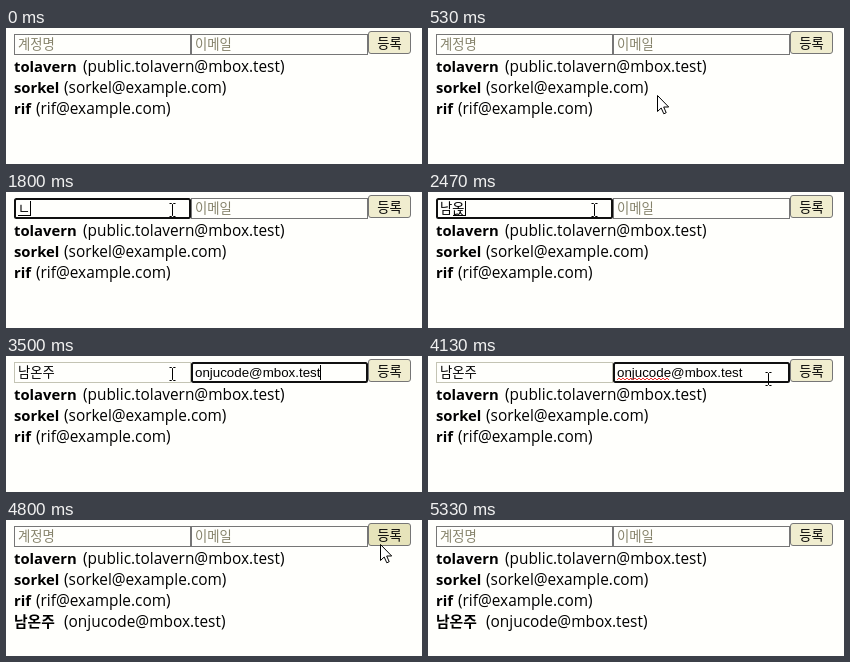
An HTML page that plays this animation: 416 px wide and 136 px high, repeating every 6110 ms.

```html
<!DOCTYPE html>
<html lang="ko">
<head>
<meta charset="utf-8">
<style>
  html, body { margin: 0; width: 100%; height: 100%; overflow: hidden; background: #fffffc; }
  svg { display: block; }
  text { white-space: pre; }
  .list { font: 15.4px "Open Sans", "Noto Sans CJK KR", sans-serif; }
  .list .name { font-weight: 700; font-size: 14.8px; }
  .form { font: 13.333px "Liberation Sans", "Noto Sans CJK KR", sans-serif; }
</style>
</head>
<body>
<svg id="stage" width="416" height="136" viewBox="0 0 416 136"></svg>
<script>
const LOOP = 6110;
const stage = document.getElementById('stage');

function add(tag, attrs, parent = stage, text = '') {
  const el = document.createElementNS('http://www.w3.org/2000/svg', tag);
  set(el, attrs);
  el.textContent = text;
  return parent.appendChild(el);
}
function set(el, attrs) {
  for (const key in attrs) el.setAttribute(key, attrs[key]);
}
function show(el, on) {
  el.style.display = on ? '' : 'none';
}

// User list
const users = [
  ['tolavern', 'public.tolavern@mbox.test', 77],
  ['sorkel', 'sorkel@example.com', 58],
  ['rif', 'rif@example.com', 30],
  ['남온주', 'onjucode@mbox.test', 58]
];
const list = add('g', { class: 'list' });
const rows = users.map(([name, mail, x], i) => {
  const row = add('g', { transform: `translate(0 ${44 + i * 21})` }, list);
  add('text', { x: 8, class: 'name' }, row, name);
  add('text', { x }, row, `(${mail})`);
  return row;
});

// Form
const form = add('g', { class: 'form' });
function makeField(x, hint) {
  return {
    x, hint,
    box: add('rect', { fill: '#fffffc' }, form),
    label: add('text', { x: x + 4, y: 21 }, form),
    line: add('rect', { y: 23, height: 1 }, form),
    caret: add('rect', { y: 9, width: 1, height: 15 }, form)
  };
}
const nameField = makeField(8, '계정명');
const mailField = makeField(185, '이메일');
const squiggle = add('path', {
  d: 'M189 24' + 'l2 -2l2 2'.repeat(13), fill: 'none', stroke: '#f03030'
}, form);
const button = add('rect', {
  x: 362.5, y: 3.5, width: 42, height: 22, rx: 2.5, stroke: '#767676'
}, form);
add('text', { x: 383.5, y: 20, 'text-anchor': 'middle' }, form, '등록');

// Pointer shapes, hot spot at the origin
const arrow = add('path', {
  d: 'M0.5 0.5V16.5L4.2 13L6.8 18.8L9.2 17.7L6.7 12H11.7Z',
  fill: '#fff', stroke: '#000'
});
const beam = add('path', {
  d: 'M-3 -6.5H-1L0 -5.5L1 -6.5H3M0 -5.5V5.5M-3 6.5H-1L0 5.5L1 6.5H3',
  fill: 'none', stroke: '#000'
});

const keys = [
  [1800, 'ㄴ'], [1900, '나'], [2000, '남'], [2100, '남ㅇ'],
  [2200, '남오'], [2300, '남온'], [2470, '남옩'], [2500, '남온주']
];
const path = [
  [330, 267, 104], [470, 246, 82], [620, 205, 44], [800, 168, 18], [900, 167, 18],
  [3870, 167, 18], [4000, 255, 17], [4130, 341, 23], [4300, 367, 30], [4470, 373, 31],
  [4540, 373, 31], [4570, 374, 27], [4630, 374, 24], [5200, 374, 24], [5330, 380, 104]
];
const pressed = 4700, sent = 4800;

function pointerAt(t) {
  const i = path.findIndex(p => p[0] > t);
  if (i < 1) return null;
  const [t0, x0, y0] = path[i - 1], [t1, x1, y1] = path[i];
  const k = (t - t0) / (t1 - t0);
  return { x: Math.round(x0 + (x1 - x0) * k), y: Math.round(y0 + (y1 - y0) * k) };
}

// Latest caret reset decides the blink phase
function caretOn(t) {
  const resets = [900, ...keys.map(k => k[0]), 2730, 3500, 3570];
  const last = Math.max(...resets.filter(r => r <= t));
  return (t - last) % 1000 < 500;
}

function drawField(field, value, focused, composing, t) {
  set(field.box, focused
    ? { x: field.x + 1, y: 7, width: 175, height: 19, rx: 1.5, stroke: '#101010', 'stroke-width': 2 }
    : { x: field.x + 0.5, y: 6.5, width: 176, height: 20, rx: 0,
        stroke: value ? '#c4c4b4' : '#767676', 'stroke-width': 1 });
  field.label.textContent = value || field.hint;
  set(field.label, { fill: value ? '#000' : '#85826a' });
  const width = value ? field.label.getComputedTextLength() : 0;
  const end = Math.round(field.x + 4 + width);
  set(field.caret, { x: end });
  show(field.caret, focused && caretOn(t));
  set(field.line, { x: end - 12, width: 12 });
  show(field.line, composing);
}

function draw(t) {
  const typed = keys.filter(k => k[0] <= t).pop();
  const name = typed && t < sent ? typed[1] : '';
  const mail = t >= 3500 && t < sent ? users[3][1] : '';
  drawField(nameField, name, t >= 900 && t < 2730, !!name && t < 2700, t);
  drawField(mailField, mail, t >= 2730 && t < pressed, false, t);
  show(squiggle, t >= 3570 && t < pressed);
  show(rows[3], t >= sent);

  const p = pointerAt(t);
  const over = p && p.x >= 362 && p.y <= 27;
  const held = t >= pressed && t < sent;
  set(button, { fill: held ? '#f5f4e0' : over ? '#e6e3ba' : '#f0edcf' });

  const inField = p && p.x < 362 && p.y < 28;
  const onText = p && p.x < 283 && p.y >= 28 && p.y < 49;
  show(beam, p && (inField || onText));
  show(arrow, p && !inField && !onText);
  if (p) {
    set(beam, { transform: `translate(${p.x - 0.5} ${p.y})` });
    set(arrow, { transform: `translate(${p.x} ${p.y})` });
  }
}

const start = performance.now();
function frame() {
  draw((performance.now() - start) % LOOP);
  requestAnimationFrame(frame);
}
frame();
</script>
</body>
</html>
```
